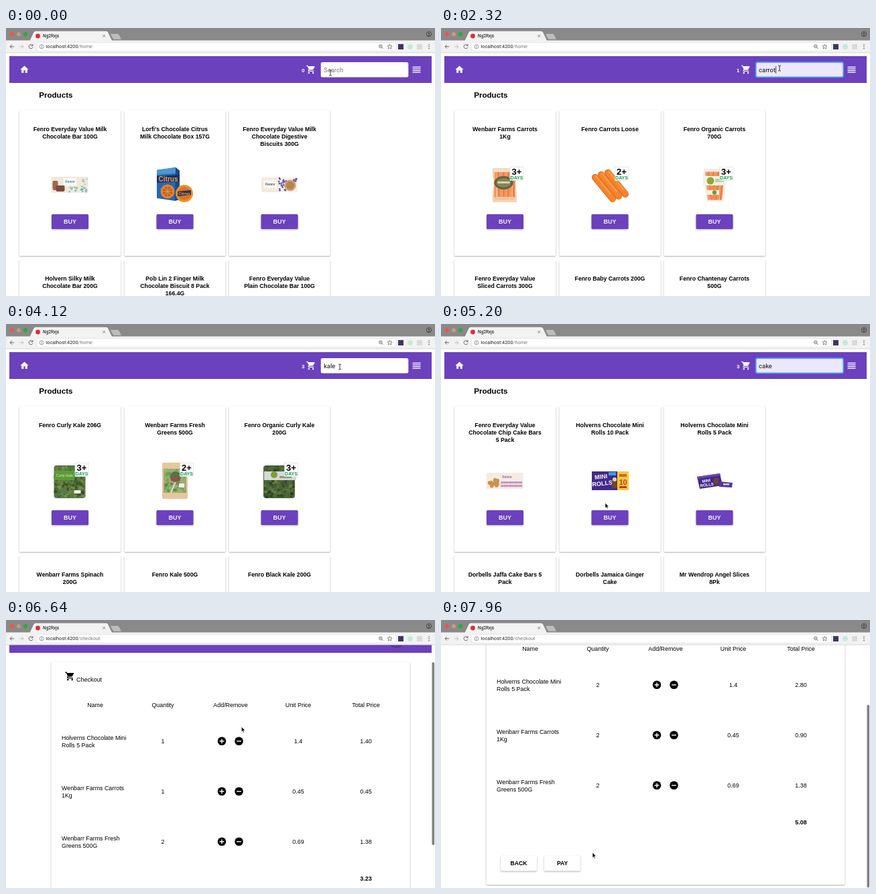
An HTML page for the animation above (8000 ms loop, 640 by 400 pixels).

```html
<!DOCTYPE html>
<html lang="en">
<head>
<meta charset="utf-8">
<title>Shop demo</title>
<style>
  html, body { margin: 0; width: 100%; height: 100%; overflow: hidden; background: #fff; }
  svg { display: block; width: 640px; height: 400px; font-family: "Liberation Sans", Arial, sans-serif; }
  .card { fill: #fff; filter: drop-shadow(0 1px 1px rgba(0, 0, 0, .32)); }
  .button { fill: #6b41bd; filter: drop-shadow(0 1px 1px rgba(0, 0, 0, .32)); }
  .system { font-family: Roboto, sans-serif; }
  text { white-space: pre; }
</style>
</head>
<body>
<svg id="stage" viewBox="0 0 640 400"></svg>
<script>
const LOOP = 8000, PURPLE = '#6b41bd';
const COLUMNS = [95.5, 252, 408];
const CHECKOUT_AT = 5960;

// ---- drawing helpers ----
const box = (x, y, w, h, fill, extra = '') =>
  `<rect x="${x}" y="${y}" width="${w}" height="${h}" fill="${fill}" ${extra}/>`;
const disc = (x, y, r, fill, extra = '') =>
  `<circle cx="${x}" cy="${y}" r="${r}" fill="${fill}" ${extra}/>`;
const path = (d, fill, extra = '') => `<path d="${d}" fill="${fill}" ${extra}/>`;
const line = (d, stroke, width, extra = '') =>
  path(d, 'none', `stroke="${stroke}" stroke-width="${width}" ${extra}`);
const group = (x, y, body, more = '') => `<g transform="translate(${x} ${y}) ${more}">${body}</g>`;
const text = (s, x, y, size, extra = '') => `<text x="${x}" y="${y}" font-size="${size}" ${extra}>${s}</text>`;
const MID = 'text-anchor="middle"', BOLD = 'font-weight="700"', SYSTEM = 'class="system"';
const ROUND = 'stroke-linecap="round"';
const repeat = (n, draw) => Array.from({ length: n }, (_, i) => draw(i)).join('');

let seed = 7;
const rand = (lo, hi) => lo + (hi - lo) * (seed = seed * 16807 % 2147483647) / 2147483647;
const speckle = (n, x, y, w, h, r, fill) => repeat(n, () => disc(rand(x, x + w), rand(y, y + h), r, fill));

// ---- icons on a 24 unit grid ----
const icon = (cx, cy, scale, body) => group(cx, cy, body, `scale(${scale}) translate(-12 -12)`);
const homeIcon = path('M10 20v-6h4v6h5v-8h3L12 3 2 12h3v8z', '#fff');
const cartIcon = fill => path('M1 2h3.3l.9 2H20q1.5 0 .9 1.5l-3.6 6.5q-.5 1-1.8 1H8.1l-.9 1.7q0 .3.3.3H19v2H7q-3-.3-1.8-3l1.4-2.4L3 4H1z', fill)
  + disc(7, 20, 2, fill) + disc(17, 20, 2, fill);
const menuIcon = repeat(4, i => box(4, 6.2 + 3.5 * i, 16, 1.7, '#fff'));

// ---- product pictures in a 56 unit square ----
const badge = days => box(35.5, 1.5, 20, 20, '#fff', 'stroke="#ddd" stroke-width=".7"')
  + text(days + '+', 45.5, 12.5, 13, `${BOLD} ${MID}`)
  + text('DAYS', 45.5, 20, 7, `${BOLD} ${MID} fill="#16994c"`);

const leaves = (x, y, w, h, count, light = 0) => repeat(count, () =>
  disc(rand(x, x + w), rand(y, y + h), rand(1, 2.8), `hsl(${rand(78, 105)} ${rand(25, 42)}% ${rand(22, 46) + light}%)`));

const carrotSticks = (x, y, w, h, fan = 0) => repeat(8, i =>
  line(`M${x + 3 + i * (w - 6) / 7} ${y + 2}l${(3.5 - i) * fan + rand(-1, 1)} ${h - 4}`, i % 2 ? '#ea8148' : '#f4985f', 3.6, ROUND));

const looseCarrot = (x, y) => line(`M${x} ${y}l26 32`, '#d9681a', 10, ROUND)
  + line(`M${x + .4} ${y}l26 32`, '#f5842c', 8.6, ROUND)
  + line(`M${x + 1} ${y - 2}l22 27`, '#f9a255', 1.6, ROUND);

const art = {
  milkBar: () => box(0, 16, 55, 24, '#f1e8da', 'rx="1"') + box(2, 22, 8, 14, '#9b6a55', 'rx="2"')
    + box(7, 29, 13, 9, '#7d4c3c', 'rx="2"') + box(18, 18, 20, 11, '#fbf8f2')
    + speckle(22, 27, 30, 27, 9, 1.2, '#6fbcbb') + speckle(8, 43, 19, 11, 9, 1.1, '#8ccac6')
    + text('Fenro', 28, 25, 5, `${BOLD} ${MID} fill="#3f7fa0"`),
  citrusBox: () => path('M1 6L29 2l6 5v43l-7 2-27-4z', '#2368b4') + path('M1 6L29 2v9L1 13z', '#4a97d3')
    + path('M29 2l6 5v43l-7 2z', '#174a8c') + disc(17, 38, 10.5, '#e5842b') + disc(17, 38, 7.5, '#b95f24')
    + repeat(8, i => line('M17 38v-8', '#ee9b43', 1, `transform="rotate(${i * 45} 17 38)"`))
    + path('M1 15L35 13v10L1 25z', '#1a2f6b') + text('Citrus', 18, 22.6, 10, `${BOLD} ${MID} fill="#f5a13a"`)
    + disc(42, 41, 13, '#f0922a') + disc(42, 41, 10, '#d9761f') + path('M32 38l20-2v7l-20 2z', '#2a2f5e')
    + text('Citrus', 42, 43, 6, `${BOLD} ${MID} fill="#f5a13a"`),
  digestives: () => box(1, 17, 54, 22, '#f3eadb', 'rx="3"') + box(26, 17, 29, 22, '#f4f0f1', 'rx="2"')
    + speckle(24, 27, 18, 11, 20, 1.3, '#5d5596') + speckle(8, 49, 18, 5, 5, 1.2, '#5d5596')
    + disc(44, 29, 8.5, '#d3a26c') + disc(44, 29, 6, '#b98350') + box(4, 21, 20, 12, '#faf6ee')
    + text('Fenro', 14, 28.5, 5, `${BOLD} ${MID} fill="#456"`),
  carrotBag: () => path('M10 3h35l1 6-2 18 2 21-1 6H10l-1-6 2-21-2-18z', '#f6d4b6') + carrotSticks(11, 8, 33, 40)
    + box(11, 4, 33, 5, '#f3dfca') + `<ellipse cx="26" cy="25" rx="14" ry="10" fill="#5f6440"/>`
    + `<ellipse cx="26" cy="25" rx="11" ry="7" fill="#85855a"/>` + box(17, 23, 18, 3, '#d8d3ac')
    + box(13, 46, 29, 5, '#f3c6a0') + badge(3),
  looseCarrots: () => looseCarrot(25, 10) + looseCarrot(15, 13) + looseCarrot(6, 17) + badge(2),
  organicCarrots: () => path('M12 4h33l1 12-4 37H17L11 16z', '#f8ede4') + carrotSticks(13, 8, 31, 43, 1.3)
    + box(11, 15, 34, 14, '#f1f2e8') + disc(22, 22, 5.5, '#8fa83c') + box(29, 19, 13, 5, '#c3cfa0')
    + box(16, 36, 19, 7, '#f6efe5') + disc(28, 39.5, 3.2, '#79973d') + badge(3),
  kaleBag: () => box(4, 5, 47, 49, '#5d7748', 'rx="4"') + leaves(6, 7, 43, 45, 170)
    + box(5, 13, 30, 14, '#5c9b36') + text('Curly Kale', 20, 22, 5.5, `${MID} fill="#d9efc0"`) + box(34, 42, 10, 5, '#eef0e6') + badge(3),
  greensBag: () => box(9, 1, 38, 54, '#e6c69c', 'rx="2"') + box(11, 10, 34, 36, '#9dab7c') + leaves(13, 12, 30, 32, 75, 15)
    + line('M22 46Q28 30 37 14', '#d9e2bd', 2) + disc(29, 22, 8, '#55734a') + box(22, 24, 14, 4, '#b6403c') + box(34, 32, 8, 6, '#f2f0e5') + badge(2),
  organicKale: () => box(4, 5, 47, 49, '#4f6540', 'rx="4"') + leaves(6, 7, 43, 45, 170, -5)
    + box(5, 14, 48, 13, '#d5d9d2') + disc(20, 19, 5, '#7d9d3b') + box(28, 21, 18, 3, '#8c9586') + badge(3),
  cakeBars: () => box(0, 16, 55, 24, '#f4ebe4', 'rx="1"') + speckle(11, 3, 27, 15, 9, 3, '#cd914d')
    + text('Fenro', 31, 24, 5, `${BOLD} ${MID} fill="#845b91"`)
    + repeat(28, i => box(22 + i % 14 * 2.3, 29 + (i > 13 ? 5 : 0), 1.4, 3.2, '#a76aa9')),
  rollsTen: () => box(1, 14, 55, 28, '#43288a') + box(39, 14, 17, 28, '#f3cd35')
    + text('MINI', 15, 25, 9, `${BOLD} ${MID} fill="#fff" transform="rotate(-6 15 25)"`)
    + text('ROLLS', 17, 35, 9, `${BOLD} ${MID} fill="#fff" transform="rotate(-6 17 35)"`)
    + box(26, 15, 11, 5, '#3d9bd8') + box(31, 25, 8, 14, '#70452f', 'rx="3"') + disc(35, 26, 3, '#e7d0b5')
    + text('10', 47.5, 34, 11, `${BOLD} ${MID} fill="#cf3038"`) + box(42, 18, 11, 4, '#d8603c') + box(42, 36, 11, 3, '#cf3038'),
  rollsFive: () => path('M2 22L36 17l4 18L6 40z', '#45298c') + path('M2 22l34-5 1 3L3 25z', '#654ab0')
    + text('MINI', 16, 30, 6, `${BOLD} ${MID} fill="#fff" transform="rotate(-8 16 30)"`)
    + text('ROLLS', 17, 36, 6, `${BOLD} ${MID} fill="#fff" transform="rotate(-8 17 36)"`)
    + box(27, 24, 7, 9, '#70452f', 'rx="2"') + path('M35 29l20 2-1 7-19-1z', '#55379c') + box(41, 32, 9, 2.5, '#d8cfee'),
};

const catalogue = {
  start: [
    ['Fenro Everyday Value Milk|Chocolate Bar 100G', 'milkBar'],
    ["Lorfi's Chocolate Citrus|Milk Chocolate Box 157G", 'citrusBox'],
    ['Fenro Everyday Value Milk|Chocolate Digestive|Biscuits 300G', 'digestives'],
    ['Holvern Silky Milk|Chocolate Bar 200G'],
    ['Pob Lin 2 Finger Milk|Chocolate Biscuit 8 Pack|166.4G'],
    ['Fenro Everyday Value|Plain Chocolate Bar 100G'],
  ],
  carrot: [
    ['Wenbarr Farms Carrots|1Kg', 'carrotBag'],
    ['Fenro Carrots Loose', 'looseCarrots'],
    ['Fenro Organic Carrots|700G', 'organicCarrots'],
    ['Fenro Everyday Value|Sliced Carrots 300G'],
    ['Fenro Baby Carrots 200G'],
    ['Fenro Chantenay Carrots|500G'],
  ],
  kale: [
    ['Fenro Curly Kale 206G', 'kaleBag'],
    ['Wenbarr Farms Fresh|Greens 500G', 'greensBag'],
    ['Fenro Organic Curly Kale|200G', 'organicKale'],
    ['Wenbarr Farms Spinach|200G'],
    ['Fenro Kale 500G'],
    ['Fenro Black Kale 200G'],
  ],
  cake: [
    ['Fenro Everyday Value|Chocolate Chip Cake Bars|5 Pack', 'cakeBars'],
    ['Holverns Chocolate Mini|Rolls 10 Pack', 'rollsTen'],
    ['Holverns Chocolate Mini|Rolls 5 Pack', 'rollsFive'],
    ['Dorbells Jaffa Cake Bars 5|Pack'],
    ['Dorbells Jamaica Ginger|Cake'],
    ['Mr Wendrop Angel Slices|8Pk'],
  ],
};

const lines = (s, x, y, size, extra) => s.split('|').map((part, i) => text(part, x, y + 11 * i, size, extra)).join('');

const productCard = ([title, picture], i) => {
  const cx = COLUMNS[i % 3], top = i < 3 ? 123 : 346;
  return box(cx - 75.5, top, 151, 217, '#fff', 'class="card" rx="1"')
    + lines(title, cx, top + 31.2, 8.7, `${BOLD} ${MID}`)
    + (picture ? group(cx - 28, 206, art[picture]()) + box(cx - 27.5, 278, 55, 22, PURPLE, 'class="button" rx="1.5"')
      + text('BUY', cx, 292.3, 9, `${BOLD} ${MID} fill="#f4f0fb"`) : '');
};
const shelves = Object.fromEntries(Object.entries(catalogue).map(([key, items]) =>
  [key, text('Products', 49.2, 104, 11.6, BOLD) + items.map(productCard).join('')]));

// ---- timeline ----
const latest = (steps, t) => steps.reduce((value, [at, next]) => t >= at ? next : value, steps[0][1]);
const typing = (word, at, step) => [...word].map((_, i) => [at + i * step, word.slice(0, i + 1)]);

const queryText = [[0, ''], ...typing('carrot', 520, 90), ...typing('kale', 2560, 120), ...typing('cake', 4360, 90)];
const shelfShown = [[0, 'start'], [1240, 'carrot'], [3080, 'kale'], [4800, 'cake']];
const cartCount = [[0, 0], [1720, 1], [3460, 2], [3640, 3], [5640, 4]];
const focusSpans = [[100, 1680], [2240, 3420], [4160, 5600]];
const selectSpans = [[2440, 2560], [4240, 4360]];
const buyClicks = [[1680, 0], [3420, 1], [3600, 1], [5600, 2]];
const scrollKeys = [[6440, 0], [6600, 33], [7560, 33], [7800, 117]];
const pointerKeys = [
  [40, 484, 67], [320, 498, 63], [1360, 498, 63], [1640, 97, 288], [1800, 97, 288], [2160, 505, 60],
  [3080, 505, 60], [3360, 253, 288], [3700, 253, 288], [4080, 498, 64], [4800, 497, 64], [5200, 245, 267],
  [5500, 409, 288], [5680, 409, 288], [5880, 455, 62], [6060, 455, 62], [6240, 451, 67], [6440, 440, 90],
  [6740, 321, 183], [6960, 321, 183], [7160, 321, 258], [7560, 321, 258], [7840, 226, 347],
];

const tween = (keys, t) => {
  const next = keys.findIndex(k => k[0] > t);
  if (next < 1) return (next ? keys[keys.length - 1] : keys[0]).slice(1);
  const a = keys[next - 1], b = keys[next], p = (t - a[0]) / (b[0] - a[0]), e = p * p * (3 - 2 * p);
  return a.slice(1).map((v, i) => v + (b[i + 1] - v) * e);
};
const spanAt = (spans, t) => spans.find(([from, to]) => t >= from && t < to);

// ---- page parts ----
const toolbar = box(5, 42, 630, 40, PURPLE) + icon(27.5, 62, .62, homeIcon) + icon(612.5, 62, .75, menuIcon);

const ruler = document.createElement('canvas').getContext('2d');
ruler.font = '9.5px Roboto, sans-serif';

function searchField(t) {
  const value = latest(queryText, t), focus = spanAt(focusSpans, t), selected = spanAt(selectSpans, t);
  const width = ruler.measureText(value).width;
  const lastEdit = focus && Math.max(focus[0], ...queryText.map(k => k[0]).filter(at => at <= t));
  const caret = focus && !selected && (t - lastEdit) % 1060 < 530;
  return box(469.7, 51, 130.6, 22.4, focus ? '#ece8f9' : '#fff', `rx="2.5" ${focus ? 'stroke="#4b96ee" stroke-width="1.8"' : ''}`)
    + (selected ? box(474, 57, width, 12, '#b0d2fc') : '')
    + text(value || 'Search', 474, 65.7, 9.5, `${SYSTEM} fill="${value ? '#111' : '#777'}"`)
    + (caret ? box(474.3 + width, 57, .8, 11, '#222') : '');
}

function homePage(t) {
  const ripples = buyClicks.map(([at, column]) => {
    const p = (t - at) / 300;
    return p >= 0 && p < 1 ? box(COLUMNS[column] - 27.5, 278, 55, 22, '#fff', `rx="1.5" opacity="${.28 * (1 - p)}"`) : '';
  }).join('');
  return shelves[latest(shelfShown, t)] + ripples + toolbar
    + (t > 5880 ? disc(451, 62, 13, '#5936a0') : '')
    + text(latest(cartCount, t), 443.3, 65.6, 8, `${BOLD} ${MID} fill="#fff"`)
    + icon(455, 62, .62, cartIcon('#fff')) + searchField(t);
}

const order = t => [
  ['Holverns Chocolate Mini|Rolls 5 Pack', t < 6840 ? 1 : 2, 1.4],
  ['Wenbarr Farms Carrots|1Kg', t < 7480 ? 1 : 2, .45],
  ['Wenbarr Farms Fresh|Greens 500G', 2, .69],
];

const roundButton = (x, y, sign) => disc(x, y, 6.3, '#000') + line(`M${x - 3.4} ${y}h6.8${sign > 0 ? `M${x} ${y - 3.4}v6.8` : ''}`, '#fff', 1.4);
const flatButton = (x, label) => box(x, 469, 54, 22.5, '#fff', 'class="card" rx="1"') + text(label, x + 27, 483.2, 8.6, `${BOLD} ${MID}`);
const onPlus = (px, py, y) => Math.hypot(px - 322, py - y) < 10;

function checkoutPage(t, scroll, [px, py]) {
  const cell = (s, column, y, extra = '') => text(s, 133 + 101 * column, y, 8.9, `${MID} ${extra}`);
  const items = order(t);
  const rows = items.map(([name, count, price], i) => {
    const y = 213.8 + 75 * i;
    return lines(name, 83, y - 2.3, 8.9) + cell(count, 1, y + 2.8) + cell(price, 3, y + 2.8) + cell((count * price).toFixed(2), 4, y + 2.8)
      + (onPlus(px, py + scroll, y) ? disc(322, y, 13, '#dedede') : '')
      + roundButton(322, y, 1) + roundButton(347.5, y, -1);
  }).join('');
  const total = items.reduce((sum, [, count, price]) => sum + count * price, 0).toFixed(2);
  return group(0, -scroll, toolbar + disc(582.5, 62, 13, '#5936a0')
    + text(4, 573.5, 65.4, 8, `${MID} fill="#fff"`) + icon(585.5, 62, .62, cartIcon('#d3c9e8'))
    + box(67.5, 96, 535, 416, '#fff', 'class="card" rx="1"')
    + icon(95.5, 117, .64, cartIcon('#000')) + text('Checkout', 105, 124.5, 9)
    + ['Name', 'Quantity', 'Add/Remove', 'Unit Price', 'Total Price'].map((s, i) => cell(s, i, 163.4)).join('')
    + rows + cell(total, 4, 422.3, BOLD) + flatButton(89, 'BACK') + flatButton(154, 'PAY'));
}

function scrollbar(t, scroll) {
  const shown = spanAt([[6440, 7000], [7560, LOOP]], t);
  return shown ? box(635.5, 38 + scroll * 363 / 480, 3.6, 273, '#808080', 'rx="1.8"') : '';
}

const browser = box(0, 0, 640, 19, '#898989') + box(0, 18.5, 640, 18.5, '#f2f2f2') + box(0, 36.6, 640, .8, '#cfcfcf')
  + ['#f0544c', '#c49a7c', '#22ad3c'].map((c, i) => disc(9 + 10 * i, 9.3, 3.1, c)).join('')
  + path('M35.5 19l6-12.5q.8-1.8 2.8-1.8h105q2 0 2.8 1.8l6 12.5z', '#f2f2f2')
  + path('M156 8.8h10q2 0 3 2l3 6h-10q-2 0-3-2z', '#bdbdbd')
  + disc(47.5, 12, 3.4, '#d5313a') + text('Ng2Rxjs', 55, 14.3, 6.5, SYSTEM) + line('M144.5 10l3.6 3.6m0-3.6l-3.6 3.6', '#666', .8)
  + disc(631, 9, 3.7, 'none', 'stroke="#444" stroke-width=".9"') + disc(631, 8, 1.3, '#444') + path('M628.5 11.5q2.5-2.5 5 0z', '#444')
  + line('M12 27.8H6m2.8-2.8L6 27.8l2.8 2.8', '#555', .9) + line('M20 27.8h6m-2.8-2.8l2.8 2.8-2.8 2.8', '#bbb', .9)
  + line('M39.6 26a3 3 0 1 0 .4 2.6M40 24v2.4h-2.4', '#555', .9)
  + box(46, 21.5, 536, 12.8, '#fff', 'rx="1.5" stroke="#dadada" stroke-width=".6"')
  + disc(53, 27.8, 3, 'none', 'stroke="#666" stroke-width=".7"') + line('M53 27.2v2.2m0-3.6v.7', '#666', .8)
  + disc(558.8, 27.2, 2.3, 'none', 'stroke="#555" stroke-width=".8"') + line('M560.5 29l2 2m-5-3.8h2.6', '#555', .8)
  + line('M572.5 24.3l1 2.3 2.5.2-1.9 1.7.6 2.5-2.2-1.4-2.2 1.4.6-2.5-1.9-1.7 2.5-.2z', '#555', .7)
  + box(585, 24, 8, 8, '#3d3862') + disc(603, 28, 4, '#c4ead9') + box(613, 24, 8, 8, '#dadada')
  + repeat(3, i => disc(631, 25 + 2.8 * i, .8, '#555'));

const cursors = {
  arrow: path('M0 0V10.5L2.4 8.3 4 12 5.6 11.3 4 7.7H7.2Z', '#000', 'stroke="#fff" stroke-width=".8" transform="scale(.74)"'),
  hand: path('M1 0q1 0 1 1v3.5l3.6.8q1 .3.8 1.5L5.8 10H1.5L-1.6 6.3q-.2-1.2 1.6-.3V1q0-1 1-1z', '#fff', 'stroke="#000" stroke-width=".8"'),
  beam: line('M-2-4q2 0 2 1V3q0 1-2 1M2-4q-2 0-2 1M0 3q0 1 2 1', '#222', .9),
};

function cursorKind(home, x, y, scroll) {
  if (!home) return [0, 1, 2].some(i => onPlus(x, y + scroll, 213.8 + 75 * i)) ? 'hand' : 'arrow';
  if (x > 470 && x < 600 && y > 51 && y < 73) return 'beam';
  const overBuy = y > 278 && y < 300 && COLUMNS.some(cx => Math.abs(x - cx) < 27.5);
  return overBuy || Math.hypot(x - 453, y - 62) < 10 ? 'hand' : 'arrow';
}

function scene(t) {
  const home = t < CHECKOUT_AT, pointer = tween(pointerKeys, t), [scroll] = tween(scrollKeys, t);
  const [x, y] = pointer;
  const address = `localhost:4200<tspan fill="#777">/${home ? 'home' : 'checkout'}</tspan>`;
  return box(0, 0, 640, 400, '#fff') + (home ? homePage(t) : checkoutPage(t, scroll, pointer))
    + scrollbar(t, scroll) + browser + text(address, 59.5, 30.4, 7.3, `${SYSTEM} fill="#222"`)
    + group(x, y, cursors[cursorKind(home, x, y, scroll)]);
}

const stage = document.getElementById('stage');
const startTime = performance.now();
function tick() {
  stage.innerHTML = scene((performance.now() - startTime) % LOOP);
  requestAnimationFrame(tick);
}
tick();
</script>
</body>
</html>
```
